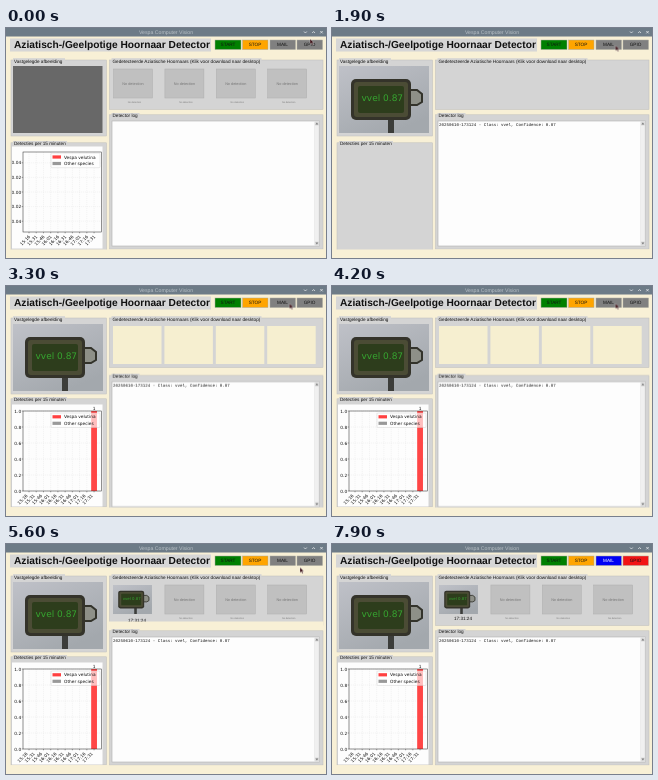
An HTML page for the animation above (8 s loop, 320 by 230 pixels).

```html
<!DOCTYPE html>
<html lang="nl">
<head>
<meta charset="utf-8">
<title>Hoornaar Detector</title>
<style>
html, body { margin: 0; width: 100%; height: 100%; overflow: hidden; background: #f8f0d6; }
svg { display: block; width: 100vw; height: 100vh; }
text { font-family: "Liberation Sans", Arial, sans-serif; text-rendering: geometricPrecision; fill: #111; }
.label text { font-size: 4.68px; }
.btn text { font-size: 4.7px; text-anchor: middle; }
.plot text { font: 4.3px "DejaVu Sans", sans-serif; }
.end { text-anchor: end; }
.mid { text-anchor: middle; }
.mono { font: 4.15px "Liberation Mono", monospace; }
.panel { fill: #d4d4d4; stroke: #bcbcbc; stroke-width: .5; }
.axes { fill: none; stroke: #222; stroke-width: .5; }
.grid { stroke: #dedede; stroke-width: .3; stroke-dasharray: 1.2 .8; }
.tick { stroke: #222; stroke-width: .4; }

/* hard cuts on the 8 s loop */
.step { animation: 8s step-end infinite; }
.idle { animation-name: idle; }
.shot { animation-name: shot; }
.data { animation-name: data; }
.blank { animation-name: blank; }
.thumbs { animation-name: thumbs; }
.squeeze { animation-name: squeeze; }
.stamp { animation-name: stamp; }
.rise { animation-name: rise; }
.sink { animation-name: sink; }
.mail { animation-name: mail; }
.mailText { animation-name: mailText; }
.gpio { animation-name: gpio; }
@keyframes idle { 0% { opacity: 1 } 23.75%, 100% { opacity: 0 } }
@keyframes shot { 0% { opacity: 0 } 23.75%, 100% { opacity: 1 } }
@keyframes data { 0% { opacity: 0 } 40%, 100% { opacity: 1 } }
@keyframes blank { 0% { opacity: 0 } 40% { opacity: 1 } 58.75%, 100% { opacity: 0 } }
@keyframes thumbs { 0% { opacity: 0 } 58.75%, 100% { opacity: 1 } }
@keyframes squeeze { 0% { opacity: 0 } 58.75% { opacity: 1 } 72.5%, 100% { opacity: 0 } }
@keyframes stamp { 0% { transform: translateY(2px) } 72.5%, 100% { transform: none } }
@keyframes rise { 0% { transform: none } 40%, 100% { transform: translateY(-2px) } }
@keyframes sink { 0% { transform: none } 40% { transform: translateY(2.7px) } 58.75%, 100% { transform: none } }
@keyframes mail { 0% { fill: #808080 } 75%, 100% { fill: #0000f4 } }
@keyframes mailText { 0% { fill: #111 } 75%, 100% { fill: #fff } }
@keyframes gpio { 0% { fill: #808080 } 82.5% { fill: #e6e6e6 } 93.75%, 100% { fill: #f21414 } }

.cursor { animation: move 8s linear infinite; }
.cursor path { animation: seen 8s step-end infinite; }
@keyframes move {
  0%, 11% { transform: translate(304px, 11px) }
  22%, 60% { transform: translate(283.5px, 17.5px) }
  67%, 74% { transform: translate(294px, 23.5px) }
  83%, 93% { transform: translate(300.5px, 16px) }
  96%, 100% { transform: translate(304px, 11px) }
}
@keyframes seen { 0% { opacity: 1 } 11% { opacity: 0 } 22% { opacity: 1 } 95%, 100% { opacity: 0 } }
</style>
</head>
<body>
<svg viewBox="0 0 320 230" preserveAspectRatio="none">
  <defs>
    <linearGradient id="wall" x2=".6" y2="1">
      <stop stop-color="#bfc1c8"/><stop offset="1" stop-color="#a3a8ad"/>
    </linearGradient>
    <g id="photo">
      <rect width="90" height="67" fill="url(#wall)"/>
      <path d="M49 52h6v15h-6z" fill="#3c3d3a"/>
      <path d="M70 24h8l5 4v8l-5 3h-8" fill="#8e9088" stroke="#33332b" stroke-width="2"/>
      <rect x="12" y="13" width="60" height="41" rx="5" fill="#34332a"/>
      <rect x="15" y="16" width="54" height="35" rx="3" fill="#4b4c35"/>
      <rect x="19" y="20" width="46" height="27" rx="2" fill="#2d3d1c"/>
      <text x="22.5" y="34.6" style="font:9px 'DejaVu Sans',sans-serif;fill:#36a530">vvel 0.87</text>
    </g>
    <clipPath id="canvas"><path d="M6 118h90.5v102.5H6z"/></clipPath>
  </defs>

  <rect width="320" height="230" fill="#f8f0d6"/>
  <rect width="320" height="8.5" fill="#6d7b87"/>
  <text x="160" y="5.8" class="mid" style="font-size:5.2px;fill:#b9c1c7">Vespa Computer Vision</text>
  <path d="M298 3.5l1.4 1.5 1.4-1.5M306.2 5l1.4-1.5 1.4 1.5M314.3 3l2.4 2.4m0-2.4l-2.4 2.4" fill="none" stroke="#e2e6e9" stroke-width=".8"/>

  <rect x="4" y="10.5" width="201" height="13" fill="#d6d6d6"/>
  <text x="8" y="20.4" style="font-size:10.2px;font-weight:bold">Aziatisch-/Geelpotige Hoornaar Detector</text>
  <g class="btn" stroke="#a9a9a0" stroke-width=".5">
    <rect x="209" y="12" width="26" height="9.5" fill="#008000"/>
    <rect x="236.5" y="12" width="25.5" height="9.5" fill="#ffa500"/>
    <rect x="264" y="12" width="25.5" height="9.5" class="step mail"/>
    <rect x="291" y="12" width="25.5" height="9.5" class="step gpio"/>
    <g stroke="none">
      <text x="222" y="18.4">START</text>
      <text x="249" y="18.4">STOP</text>
      <text x="276.5" y="18.4" class="step mailText">MAIL</text>
      <text x="303.5" y="18.4">GPIO</text>
    </g>
  </g>

  <g class="label">
    <g id="photoPanel"></g>
    <g id="plotPanel" class="step rise"></g>
    <g id="cellPanel"></g>
  </g>

  <rect x="7" y="38" width="89.5" height="67" fill="#686868"/>
  <use href="#photo" x="7" y="38" class="step shot"/>

  <g class="plot" clip-path="url(#canvas)">
    <g class="step idle" id="emptyPlot"></g>
    <g class="step data" id="barPlot"></g>
  </g>

  <g class="step idle" id="idleCells"></g>
  <g class="step blank" id="blankCells" fill="#f6efd0"></g>
  <g class="step thumbs">
    <use href="#photo" transform="translate(107 41) scale(.433)"/>
    <text x="131" y="75.5" class="mid step stamp" style="font-size:4.65px">17:31:24</text>
    <g id="liveCells"></g>
  </g>
  <path class="step squeeze" d="M103 77.6h214.5V84H103z" fill="#f8f0d6"/>

  <g class="step sink">
    <g class="label" id="logPanel"></g>
    <text x="107" y="97.8" class="mono step shot" xml:space="preserve"></text>
  </g>
  <rect y="221.5" width="320" height="8.5" fill="#f8f0d6"/>

  <g class="cursor"><path d="M0 0v5.2l1.3-1.1 1 2 .9-.4-1-2h1.7z" fill="#3d1218" stroke="#eee" stroke-width=".3"/></g>
</svg>
<script>
const put = (id, markup) => document.getElementById(id).innerHTML = markup;
const text = (x, y, s, attrs = '') => `<text x="${x}" y="${y}" ${attrs}>${s}</text>`;
const rect = (x, y, w, h, attrs = '') => `<rect x="${x}" y="${y}" width="${w}" height="${h}" ${attrs}/>`;
const line = (x1, y1, x2, y2, cls) => `<path d="M${x1} ${y1}L${x2} ${y2}" class="${cls}"/>`;

// Framed panel whose title interrupts the top edge
const panel = (x, y, w, h, title, titleWidth) => rect(x, y, w, h, 'class="panel"')
  + rect(x + 2, y - 1.8, titleWidth + 2, 5, 'fill="#d4d4d4"') + text(x + 3, y + 2.6, title);

put('photoPanel', panel(5, 32, 95.5, 76, 'Vastgelegde afbeelding', 50));
put('plotPanel', panel(5, 114.8, 95.5, 108, 'Detecties per 15 minuten', 52));
put('cellPanel', panel(103.5, 32, 213.5, 49.5,
  'Gedetecteerde Aziatische Hoornaars (Klik voor download naar desktop)', 148));
put('logPanel', panel(103.5, 86.8, 213.5, 134.2, 'Detector log', 26)
  + rect(106, 93, 207.5, 125, 'fill="#fdfdfd" stroke="#b0b0b0" stroke-width=".6"')
  + rect(308.5, 93.3, 4.7, 124.4, 'fill="#dcdcdc"')
  + rect(309, 97.5, 3.7, 116, 'fill="#f0f0f0"')
  + '<path d="M309.5 96.5l1.4-2 1.4 2zM309.5 214.5l1.4 2 1.4-2z" fill="#777"/>');
document.querySelector('.mono').textContent = '20250610-173124 - Class: vvel, Confidence: 0.87';

// Detection cells
const cellX = i => 107 + i * 51.4;
const cell = i => rect(cellX(i) + .5, 41, 39, 29, 'fill="#c0c0c0" stroke="#adadad" stroke-width=".5"')
  + text(cellX(i) + 20, 56.6, 'No detection', 'class="mid" style="font-size:3.8px;fill:#777"')
  + text(cellX(i) + 21.5, 74.6, 'No detection', 'class="mid" style="font-size:2.4px;fill:#777"');
const cells = [0, 1, 2, 3];
put('idleCells', cells.map(cell).join(''));
put('liveCells', cells.slice(1).map(cell).join(''));
put('blankCells', cells.map(i => rect(cellX(i), 40, 48.5, 38)).join(''));

// Bar chart
const left = 17, right = 95.5, unit = 7.23, first = 23;
const tickX = i => first + i * unit;
const clock = i => {
  const m = 15 * 60 + 16 + i * 15;
  return Math.floor(m / 60) + ':' + String(m % 60).padStart(2, '0');
};

function plot(top, yTicks, bar) {
  const base = top + 80, labelShift = bar ? -1 : 1.5;
  let out = rect(6, 118.5, 90.5, 102, 'fill="#fdfdfd"');
  for (const [y, s] of yTicks) {
    out += line(left, y, right, y, 'grid') + line(left - 1.3, y, left, y, 'tick')
      + text(left - 1.8, y + 1.6, s, 'class="end"');
  }
  for (let i = 0; i < 10; i++) {
    const x = tickX(i);
    out += line(x, top, x, base, 'grid') + line(x, base, x, base + 1.3, 'tick')
      + text(0, 0, clock(i), `class="end" transform="translate(${x + labelShift} ${base + 5}) rotate(-45)"`);
  }
  if (bar) {
    const x = tickX(9);
    out += rect(x - 2.9, top, 5.8, 80, 'fill="#ff4646"') + text(x, top - 1, '1', 'class="mid"');
  }
  out += rect(left, top, right - left, 80, 'class="axes"');
  const ly = top + (bar ? 2 : 1.2);
  out += rect(45, ly, 49, 14.5, 'rx="1" fill="#fff" fill-opacity=".65" stroke="#ccc" stroke-width=".4"');
  [['#ff4040', 'Vespa velutina'], ['#999', 'Other species']].forEach(([fill, s], i) => {
    const y = ly + 2.2 + i * 6.5;
    out += rect(46.5, y, 8.5, 3.2, `fill="${fill}"`) + text(58, y + 3.2, s);
  });
  return out;
}

put('emptyPlot', plot(124, [4, 2, 0, -2, -4].map(v =>
  [164 - v * 7.3, (v < 0 ? '\u2212' : '') + (Math.abs(v) / 100).toFixed(2)])));
put('barPlot', plot(125, [0, 1, 2, 3, 4, 5].map(i => [205 - i * 16, (i / 5).toFixed(1)]), true));
</script>
</body>
</html>
```
